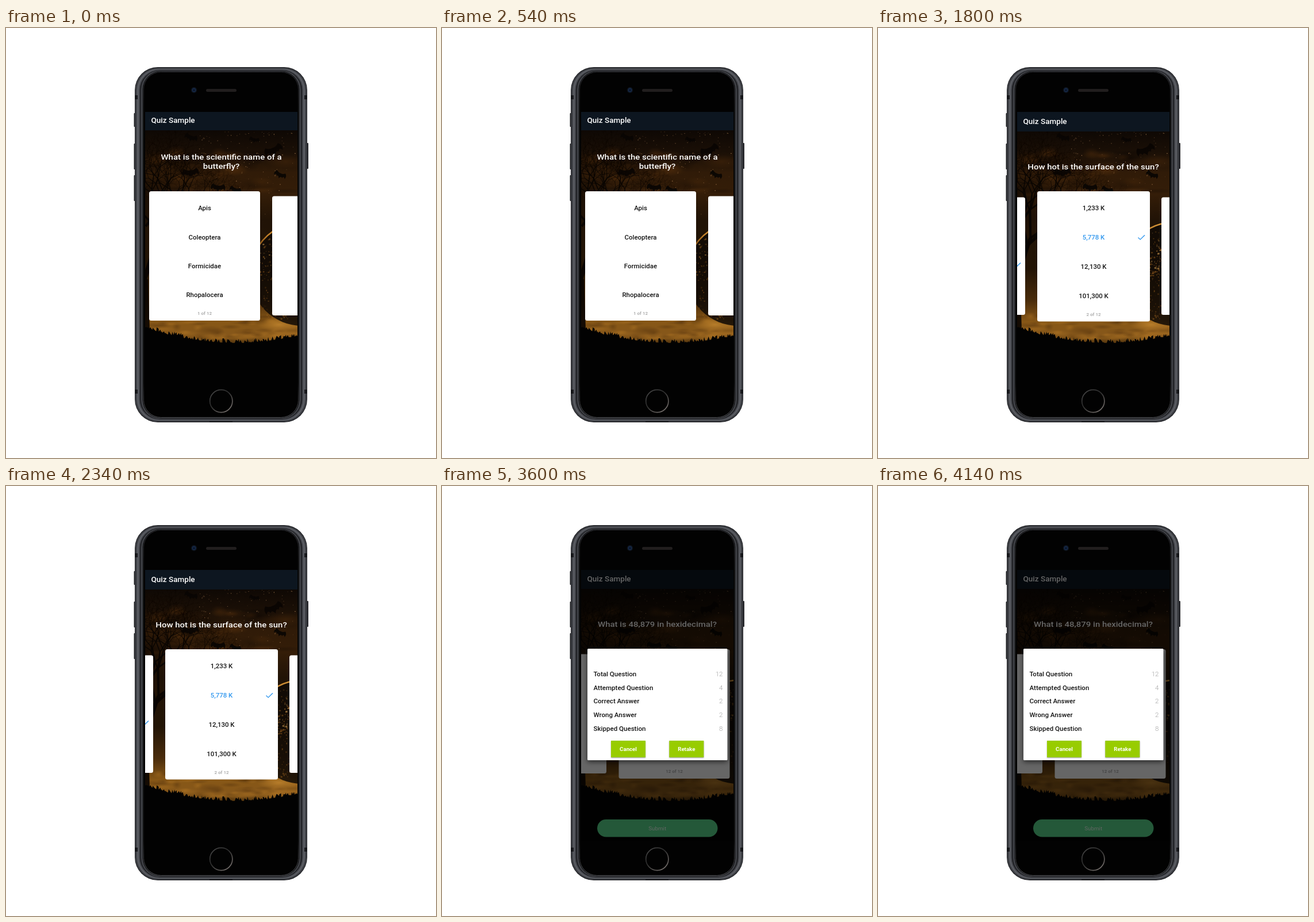
An HTML page with a canvas for the animation above (4.5 s loop, 748 px wide and 748 px high).

```html
<!DOCTYPE html>
<html lang="en">
<head>
<meta charset="utf-8">
<title>Quiz Sample</title>
<style>
  html, body { margin: 0; width: 100%; height: 100%; overflow: hidden; background: #fff; }
  canvas { display: block; }
</style>
</head>
<body>
<canvas id="stage" width="748" height="748"></canvas>
<script>
const ctx = document.getElementById('stage').getContext('2d');
const STEP = 900;
const ASPECT = 1.1; // the phone screen is uniformly widened
const BLUE = '#2e96ee';

const first = {
  bar: 178, titleY: 161,
  question: ['What is the scientific name of a', 'butterfly?'], questionY: 224,
  card: [249, 284, 193, 225], sides: [[463, 292.5, 70, 207.5]],
  options: ['Apis', 'Coleoptera', 'Formicidae', 'Rhopalocera'],
  gap: 50.4, chosen: -1, page: '1 of 12'
};
const last = {
  bar: 178, titleY: 161,
  question: ['What is 48,879 in hexidecimal?'], questionY: 240,
  card: [307.5, 284, 193, 225], sides: [[220, 292.5, 66, 207.5]],
  options: ['0x18C1', '0xBEEF', '0xDEAD', '0x12D591'],
  gap: 50.4, chosen: 1, page: '12 of 12', submit: true
};
const scenes = [
  first,
  { ...first, card: [249, 284, 193, 224], gap: 50.2, chosen: 2 },
  {
    bar: 180, titleY: 163,
    question: ['How hot is the surface of the sun?'], questionY: 241.5,
    card: [277, 284, 196, 226.5], sides: [[190, 294.5, 66, 204.5], [493, 294.5, 66, 204.5]],
    options: ['1,233 K', '5,778 K', '12,130 K', '101,300 K'],
    gap: 50.8, chosen: 1, page: '2 of 12', sideCheck: true
  },
  last,
  { ...last, bar: 179, titleY: 162, questionY: 240.5, dialog: true }
];

function seeded(seed) {
  return () => (seed = (seed * 16807) % 2147483647) / 2147483647;
}

function box(x, y, w, h, r, fill) {
  ctx.fillStyle = fill;
  ctx.beginPath();
  ctx.roundRect(x, y, w, h, r);
  ctx.fill();
}

function disc(x, y, r, fill) {
  ctx.fillStyle = fill;
  ctx.beginPath();
  ctx.arc(x, y, r, 0, 7);
  ctx.fill();
}

function gradient(x0, y0, x1, y1, stops) {
  const g = ctx.createLinearGradient(x0, y0, x1, y1);
  for (const [at, color] of stops) g.addColorStop(at, color);
  return g;
}

function glow(x, y, rx, ry, rgb, alpha) {
  const g = ctx.createRadialGradient(0, 0, 0, 0, 0, rx);
  g.addColorStop(0, `rgba(${rgb},${alpha})`);
  g.addColorStop(1, `rgba(${rgb},0)`);
  ctx.save();
  ctx.translate(x, y);
  ctx.scale(1, ry / rx);
  disc(0, 0, rx, g);
  ctx.restore();
}

// y is the middle of the capitals
function text(str, x, y, size, color, align = 'center', weight = 500) {
  ctx.save();
  ctx.translate(x, y + size * 0.355);
  ctx.scale(ASPECT, 1);
  ctx.font = `${weight} ${size}px Roboto, sans-serif`;
  ctx.textAlign = align;
  ctx.fillStyle = color;
  ctx.fillText(str, 0, 0);
  ctx.restore();
}

function check(right, y) {
  ctx.strokeStyle = BLUE;
  ctx.lineWidth = 1.4;
  ctx.beginPath();
  ctx.moveTo(right - 11.5, y + 0.3);
  ctx.lineTo(right - 7.8, y + 3.6);
  ctx.lineTo(right, y - 4);
  ctx.stroke();
}

function phone() {
  const shells = [
    [224, 68, 40, '#25262a'], [225, 69.5, 39, '#3d3f44'], [228, 71, 37, '#5b5d63'],
    [230.5, 72, 36, '#4a4c52'], [232.5, 73, 35, '#232428'], [235.5, 74, 33, '#4b4d52'],
    [237, 74.8, 32, '#292a2e'], [238.5, 75.6, 31, '#020202']
  ];
  for (const y of [148, 201, 256]) box(222.5, y, 4, y < 150 ? 24 : 45, 1, '#2b2c30');
  box(522, 200, 4, 45, 1, '#2b2c30');
  for (const [x, y, r, fill] of shells) box(x, y, 748 - 2 * x, 754 - 2 * y, r, fill);
  for (const y of [117, 629]) {
    box(224, y, 5, 7, 0, '#17181b');
    box(519, y, 5, 7, 0, '#17181b');
  }
  ctx.strokeStyle = gradient(0, 76, 0, 678, [[0, '#303136'], [0.1, '#111'], [0.9, '#111'], [1, '#55575b']]);
  ctx.lineWidth = 1;
  ctx.beginPath();
  ctx.roundRect(239.5, 76.5, 269, 601, 30);
  ctx.stroke();
  box(354, 684, 40, 2, 0, '#17181b');

  disc(327, 108, 5, '#101722');
  disc(327, 108, 3.2, '#14294a');
  disc(327, 108, 1.6, '#080e1b');
  box(348, 106, 53, 5, 2.5, '#211e1e');

  ctx.strokeStyle = gradient(360, 632, 388, 666, [[0, '#444'], [0.4, '#2b2b2b'], [1, '#77716e']]);
  ctx.lineWidth = 1.7;
  ctx.beginPath();
  ctx.arc(374.3, 649, 19.6, 0, 7);
  ctx.stroke();
}

function branch(x, y, angle, length, width, rand) {
  const bend = angle + (rand() - 0.5) * 0.5;
  const x2 = x + Math.cos(bend) * length, y2 = y + Math.sin(bend) * length;
  ctx.lineWidth = width;
  ctx.beginPath();
  ctx.moveTo(x, y);
  ctx.lineTo(x2, y2);
  ctx.stroke();
  if (length < 6) return;
  for (const side of [-1, 1]) {
    branch(x2, y2, bend + side * (0.25 + rand() * 0.5), length * (0.68 + rand() * 0.16), width * 0.66, rand);
  }
}

function bat(x, y, size, tilt) {
  ctx.save();
  ctx.translate(x, y);
  ctx.rotate(tilt);
  ctx.scale(size, size);
  ctx.fillStyle = 'rgba(9,5,3,.92)';
  ctx.beginPath();
  for (const side of [-1, 1]) {
    ctx.moveTo(0, -3);
    ctx.quadraticCurveTo(side * 5, -2, side * 9, -6);
    ctx.quadraticCurveTo(side * 14, -3, side * 12, 5);
    ctx.quadraticCurveTo(side * 8, -1, side * 6, 5);
    ctx.quadraticCurveTo(side * 3, 1, 0, 8);
  }
  ctx.fill();
  ctx.restore();
}

function nightSky() {
  const rand = seeded(4211);
  ctx.fillStyle = gradient(0, 178, 0, 548, [
    [0, '#0e0804'], [0.1, '#1a0f06'], [0.2, '#301b08'], [0.3, '#341d08'], [0.42, '#211306'],
    [0.65, '#221405'], [0.8, '#4a2c0b'], [0.9, '#875716'], [0.96, '#86571a'], [1, '#5a390f']
  ]);
  ctx.fillRect(242, 178, 265, 372);

  for (let i = 0; i < 40; i++) {
    glow(250 + rand() * 250, 215 + rand() * 75, 12 + rand() * 25, 4 + rand() * 9,
      i % 2 ? '105,58,14' : '10,5,2', 0.25);
  }
  for (let i = 0; i < 70; i++) {
    glow(242 + rand() * 265, 500 + rand() * 42, 8 + rand() * 20, 3 + rand() * 6,
      i % 3 ? '190,126,38' : '65,36,8', 0.32);
  }
  glow(475, 516, 38, 12, '215,150,55', 0.6);

  // planet with a lit rim and speckled ground
  disc(515, 428, 90, 'rgba(16,10,5,.85)');
  ctx.lineWidth = 2.4;
  ctx.strokeStyle = gradient(435, 385, 507, 335, [[0, '#6d3d0d'], [0.35, '#c28029'], [1, '#d6983d']]);
  ctx.beginPath();
  ctx.arc(515, 428, 90, 3.72, 4.75);
  ctx.stroke();
  for (let i = 0; i < 260; i++) {
    const a = 3.1 + rand() * 1.7, r = 25 + rand() * 62;
    ctx.fillStyle = `rgba(${i % 5 ? '150,95,32' : '225,170,90'},${rand() * 0.65})`;
    ctx.fillRect(515 + Math.cos(a) * r, 428 + Math.sin(a) * r, 1 + rand() * 2.5, 1 + rand() * 2);
  }
  for (let i = 0; i < 120; i++) {
    ctx.fillStyle = `rgba(165,104,35,${rand() * 0.5})`;
    ctx.fillRect(443 + rand() * 64, 420 + rand() * 85, 1 + rand() * 2, 1 + rand() * 2);
  }

  for (let i = 0; i < 150; i++) {
    const size = 0.5 + rand() * 0.8;
    ctx.fillStyle = `rgba(220,165,110,${0.15 + rand() * 0.6})`;
    ctx.fillRect(335 + rand() * 172, 180 + rand() ** 1.6 * 145, size, size);
  }

  ctx.strokeStyle = 'rgba(8,4,2,.9)';
  branch(244, 525, -1.48, 88, 12, rand);
  branch(246, 420, -1.1, 58, 6, rand);
  branch(243, 345, -0.95, 36, 4, rand);
  glow(242, 290, 65, 60, '6,3,1', 0.55);

  bat(321, 251, 1.15, -0.1);
  bat(369, 277, 1, 0.1);
  bat(399, 281, 0.8, 0.3);
  bat(322, 190, 0.9, 0.3);
  bat(465, 212, 1.3, -0.4);
  bat(477, 255, 0.85, 0.4);
  bat(432, 194, 0.7, 0.2);

  // grassy hill
  const hill = x => 546 - 27 * ((x - 400) / 158) ** 2;
  ctx.fillStyle = '#020202';
  ctx.beginPath();
  ctx.moveTo(242, 630);
  for (let x = 242; x <= 507; x += 1.5) ctx.lineTo(x + rand() * 2 - 1, hill(x) - rand() ** 2 * 8 + 2);
  ctx.lineTo(507, 630);
  ctx.fill();
}

function dialog() {
  ctx.fillStyle = 'rgba(0,0,0,.6)';
  ctx.fillRect(242, 146, 265, 472);
  ctx.save();
  ctx.shadowColor = 'rgba(0,0,0,.6)';
  ctx.shadowBlur = 8;
  ctx.shadowOffsetY = 3;
  box(253, 283, 243.5, 194, 1.5, '#fff');
  ctx.restore();

  const totals = { Total: 12, Attempted: 4, Correct: 2, Wrong: 2, Skipped: 8 };
  Object.entries(totals).forEach(([name, count], i) => {
    const y = 327.5 + i * 23.6;
    const noun = /Correct|Wrong/.test(name) ? 'Answer' : 'Question';
    text(`${name} ${noun}`, 263.5, y, 10.5, '#151515', 'left');
    text(count, 488.5, y, 10.5, '#a4a4a4', 'right', 300);
  });

  for (const [label, x] of [['Cancel', 294], ['Retake', 395.3]]) {
    ctx.save();
    ctx.shadowColor = 'rgba(0,0,0,.4)';
    ctx.shadowBlur = 2;
    ctx.shadowOffsetY = 1;
    box(x, 443, 60, 29, 0.5, '#98cc00');
    ctx.restore();
    text(label, x + 30, 458, 8.8, '#fff', 'center', 700);
  }
}

function screen(s) {
  ctx.save();
  ctx.beginPath();
  ctx.rect(242, 146, 265, 472);
  ctx.clip();
  nightSky();
  box(242, 146, 265, s.bar - 146, 0, '#0d1620');
  text('Quiz Sample', 252.5, s.titleY, 12.3, '#fff', 'left');
  s.question.forEach((line, i) => text(line, 374.5, s.questionY + i * 16, 13.6, '#fff'));

  for (const [x, y, w, h] of s.sides) box(x, y, w, h, 3.5, '#fff');
  if (s.sideCheck) check(248, 412.5);

  const [x, y, w, h] = s.card;
  const middle = x + w / 2;
  box(x, y, w, h, 3.5, '#fff');
  s.options.forEach((label, i) => {
    const chosen = i === s.chosen, rowY = 313.5 + i * s.gap;
    text(label, middle, rowY, 10.4, chosen ? BLUE : '#151515');
    if (chosen) check(x + w - 9, rowY);
  });
  text(s.page, middle, y + h - 12.5, 7.3, '#a3a3a3');

  if (s.submit) {
    box(270, 580, 209.5, 30.5, 15.25, '#5ade8f');
    text('Submit', 374.7, 595.5, 8.9, '#f1fff6', 'center', 400);
  }
  if (s.dialog) dialog();
  ctx.restore();
}

let shown = -1;
function tick(now) {
  const index = Math.floor(now / STEP) % scenes.length;
  if (index !== shown) {
    shown = index;
    ctx.clearRect(0, 0, 748, 748);
    phone();
    screen(scenes[index]);
  }
  requestAnimationFrame(tick);
}
tick(performance.now());
</script>
</body>
</html>
```
